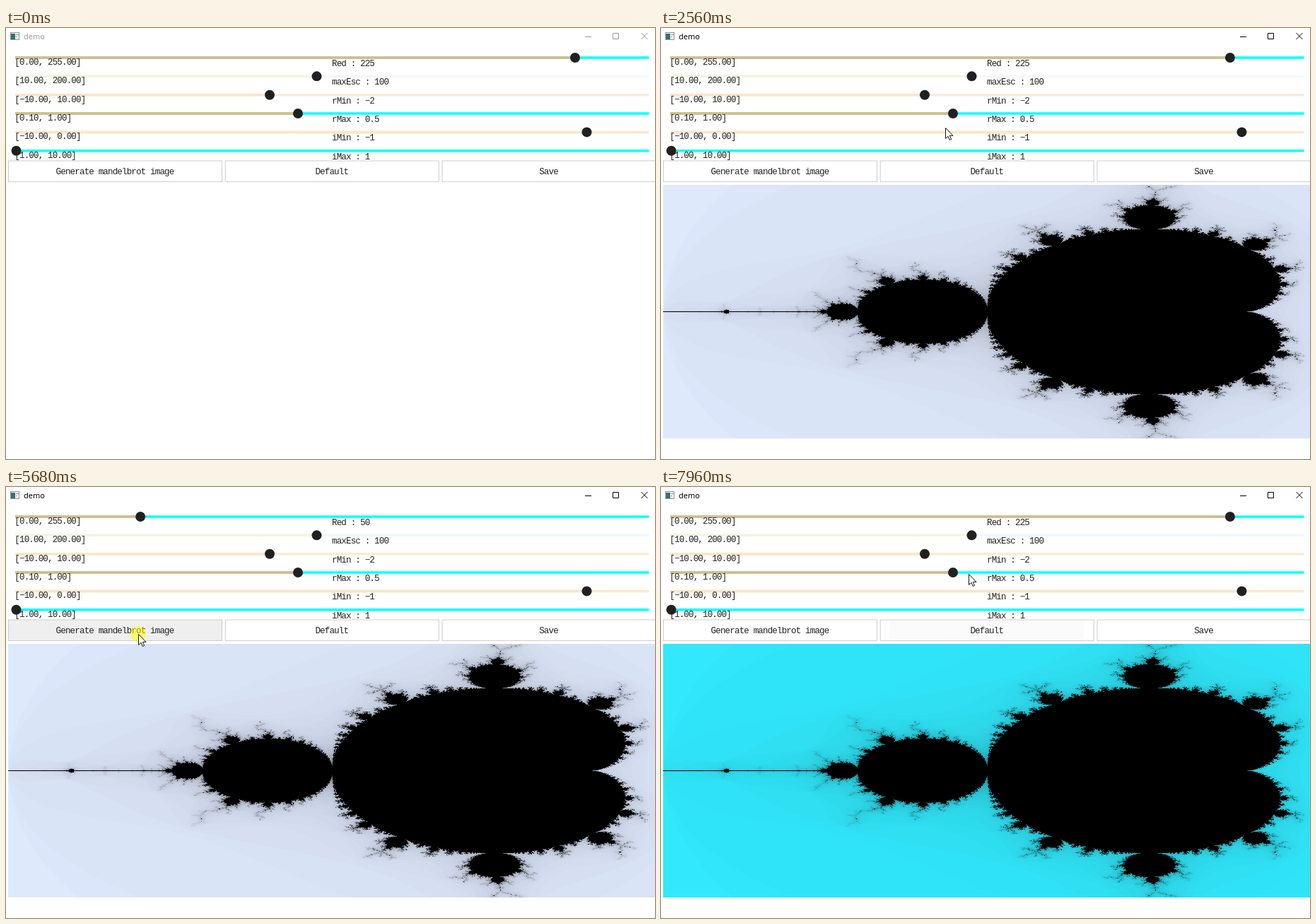
These frames come from a looping animation (918x610 px, 8 s). An HTML page with a canvas:

```html
<!DOCTYPE html>
<html lang="en">
<head>
<meta charset="utf-8">
<title>demo</title>
<style>
  html, body { margin: 0; width: 100%; height: 100%; overflow: hidden; background: #fff; }
  canvas, svg { position: absolute; left: 0; top: 0; display: block; }
  canvas { left: 3px; top: 222px; }
  text { font: 12.5px "Liberation Mono", monospace; letter-spacing: -0.83px; fill: #222; white-space: pre; }
  #title text { font: 11px "Noto Sans", sans-serif; letter-spacing: 0; fill: currentColor; }
</style>
</head>
<body>
<canvas id="image" width="915" height="359"></canvas>
<svg id="stage" width="918" height="610" viewBox="0 0 918 610"></svg>
<script>
const LOOP = 8000, STEP = 40;
const stage = document.getElementById('stage');

function add(parent, tag, attrs, text) {
  const node = document.createElementNS('http://www.w3.org/2000/svg', tag);
  set(node, attrs);
  if (text !== undefined) node.textContent = text;
  parent.appendChild(node);
  return node;
}
function set(node, attrs) {
  for (const key in attrs) node.setAttribute(key, attrs[key]);
}

// Title bar
const title = add(stage, 'g', { id: 'title' });
add(title, 'rect', { x: 6.5, y: 6.5, width: 12, height: 10, fill: '#f4f6f8', stroke: '#8b9298' });
add(title, 'rect', { x: 7, y: 8, width: 6, height: 8, fill: '#35736f' });
add(title, 'path', { d: 'M14 9.5h4M14 12.5h2', stroke: '#7b97b8' });
add(title, 'text', { x: 25, y: 16 }, 'demo');
add(title, 'path', {
  d: 'M819 12.5h9M858.5 7.5h8v8h-8zM898.5 7l9 9M907.5 7l-9 9',
  fill: 'none', stroke: 'currentColor'
});

// Sliders
const CYAN = '#00ffff', TAN = '#deb887';
const sliders = [
  ['[0.00, 255.00]', 'Red : 225', 805.5, TAN, CYAN],
  ['[10.00, 200.00]', 'maxEsc : 100', 439.5, '#f5f5dc', '#f0f8ff'],
  ['[−10.00, 10.00]', 'rMin : −2', 373, '#ffe4c4', '#faebd7'],
  ['[0.10, 1.00]', 'rMax : 0.5', 413, TAN, CYAN],
  ['[−10.00, 0.00]', 'iMin : −1', 821.5, '#ffe4c4', '#ffe8c8'],
  ['[1.00, 10.00]', 'iMax : 1', 14.5, CYAN, CYAN]
].map(([range, label, x, left, right], i) => {
  const y = 42 + i * 26.35;
  const bar = (x1, x2, color) =>
    add(stage, 'line', { x1, x2, y1: y, y2: y, stroke: color, 'stroke-width': 3.5 });
  bar(13, 909.5, right);
  const fill = bar(13, x, left);
  add(stage, 'text', { x: 12.3, y: y + 10 }, range);
  const value = add(stage, 'text', { x: 461, y: y + 12 }, label);
  const knob = add(stage, 'circle', { cx: x, cy: y, r: 7, fill: '#202020' });
  return { fill, value, knob };
});

// Buttons
const buttons = ['Generate mandelbrot image', 'Default', 'Save'].map((label, i) => {
  const x = 3.5 + i * 306.75, box = { x, y: 188, width: 302, height: 29.5 };
  const clip = add(add(stage, 'clipPath', { id: 'clip' + i }), 'rect', box);
  const hover = add(stage, 'rect', { ...box, fill: '#000', opacity: 0 });
  const ripple = add(stage, 'circle', {
    cx: x + 150.5, cy: 202.5, r: 0, fill: '#000', opacity: 0, 'clip-path': `url(#clip${i})`
  });
  add(stage, 'rect', { ...box, fill: 'none', stroke: '#cdcdcd' });
  add(stage, 'text', { x: x + 150.5, y: 206.5, 'text-anchor': 'middle' }, label);
  return { hover, ripple };
});

// Half-painted picture while the set is being computed
function partial(color, edge, curves, marks) {
  const g = add(stage, 'g', { stroke: color, fill: 'none', 'stroke-width': 0.9, display: 'none' });
  add(g, 'rect', { x: 3, y: 222, width: 915, height: 359, fill: '#000', stroke: 'none' });
  add(g, 'path', { d: curves, 'stroke-dasharray': '3 1 1 1 2 1.5' });
  add(g, 'path', { d: `M${edge} 222V581`, 'stroke-width': 1.4 });
  add(g, 'path', { d: marks, 'stroke-width': 2 });
  return g;
}
const whitePartial = partial('#dce4ee', 883.5,
  'M535 222h4M566 222.5L602 233 640 243v4L676 252.500M726 255l9 1M748 258L797 270v4L840 285 883 293' +
  'M890 362l15 4 13 8M884 368l6 6 10 3 7 7 11 6M884 427l13 3 11 7 10 3M896 463l12 5 10 4',
  'M640.5 242v5M797 269v5M884 367v6');
add(whitePartial, 'path', { d: 'M883.5 337v9M883.5 359v3M883.5 431v8M883.5 458v9', stroke: '#000', 'stroke-width': 2 });
const cyanPartial = partial('#2cc8dc', 903.5,
  'M468 222L500 235 550 257 600 271 660 284M802 293l32 6M871 301l32 8M890 222l13 3' +
  'M904 309l8 4 6 5M904 330l14 8M904 356l6 4 8 6M904 469l7 3 7 6',
  'M904 295v13M904 323v7M904 345v12M904 465v6');

// Pointer
const press = add(stage, 'circle', { r: 11, fill: '#ffff00', opacity: 0.55 });
const pointer = add(stage, 'path', {
  d: 'M.5.5V15.500L4 12.300 6.300 17.500 8.600 16.500 6.400 11.400H11Z', fill: '#fff', stroke: '#111'
});

// Mandelbrot set, shaded by escape time
const canvas = document.getElementById('image'), ctx = canvas.getContext('2d');
const MAX_ESC = 100;
const W = canvas.width, H = canvas.height;
const escapes = new Uint8Array(W * H);
function escapeTime(cr, ci) {
  let r = 0, i = 0, n = 0;
  while (n < MAX_ESC && r * r + i * i <= 4) {
    [r, i] = [r * r - i * i + cr, 2 * r * i + ci];
    n++;
  }
  return n;
}
for (let y = 0; y < H; y++)
  for (let x = 0; x < W; x++)
    escapes[y * W + x] = escapeTime(-2 + 2.5 * x / 917, -1 + 2 * y / (H - 1));
function shade(red) {
  const picture = ctx.createImageData(W, H);
  escapes.forEach((n, k) => {
    const light = 1 - n / MAX_ESC;
    picture.data.set([red * light, 235 * light, 255 * light, 255], k * 4);
  });
  return picture;
}
const pictures = { 225: shade(225), 50: shade(50) };
let shown = 0;
function showPicture(red) {
  if (red === shown) return;
  shown = red;
  if (red) ctx.putImageData(pictures[red], 0, 0);
  else ctx.clearRect(0, 0, W, H);
}

// Pointer keys: time, x, y
const path = [
  [320, 718, 553], [1120, 175, 260], [1440, 185, 205], [1960, 185, 205], [2560, 402, 141],
  [2760, 441, 77], [3640, 775, 39], [3920, 820, 39], [4080, 820, 39], [4120, 812, 43],
  [4760, 236, 57], [4840, 214, 61], [5000, 214, 61], [5520, 187, 208], [6400, 187, 208],
  [7040, 363, 97], [7240, 383, 96], [7560, 428, 210], [7720, 428, 210], [7960, 435, 123]
];
function pointerAt(t) {
  const next = path.findIndex(key => key[0] > t);
  if (next < 0) return path[path.length - 1].slice(1);
  if (next === 0) return path[0].slice(1);
  const [t0, x0, y0] = path[next - 1], [t1, x1, y1] = path[next];
  const u = (t - t0) / (t1 - t0), s = u * u * (3 - 2 * u);
  return [x0 + (x1 - x0) * s, y0 + (y1 - y0) * s];
}

const within = (t, [from, to]) => t >= from && t < to;
const clamp = v => Math.max(0, Math.min(1, v));
const presses = [[1600, 1680], [4120, 5040], [5680, 5880], [7600, 7680]];
const hovers = [[[1240, 2120], [5440, 6520]], [[7480, 7800]], []];
const releases = [[1680, 5880], [7680], []];

function redAt(t, x) {
  if (t < 4120 || t >= 7680) return 225;
  return t < 4840 ? Math.round((x - 14.5) / 3.513 / 25) * 25 : 50;
}

function render(now) {
  const t = Math.floor(now % LOOP / STEP) * STEP;
  const [x, y] = pointerAt(t);

  title.setAttribute('color', t < 1600 ? '#999' : '#000');
  set(pointer, { transform: `translate(${Math.round(x)} ${Math.round(y)})`, display: t < 320 ? 'none' : 'inline' });
  set(press, { cx: x, cy: y, display: presses.some(p => within(t, p)) ? 'inline' : 'none' });

  const red = redAt(t, x), knobX = 14.5 + red * 3.513;
  sliders[0].fill.setAttribute('x2', knobX);
  sliders[0].knob.setAttribute('cx', knobX);
  sliders[0].value.textContent = 'Red : ' + red;

  buttons.forEach(({ hover, ripple }, i) => {
    const glow = Math.max(0, ...hovers[i].map(([a, b]) => Math.min(clamp((t - a) / 120), clamp((b + 120 - t) / 120))));
    hover.setAttribute('opacity', 0.063 * glow);
    const start = releases[i].find(s => within(t, [s, s + 400]));
    const rest = start === undefined ? 0 : 1 - (t - start) / 400;
    set(ripple, { r: 151 * (1 - rest * rest), opacity: 0.085 * rest ** 1.5 });
  });

  showPicture(t < 2000 ? 0 : t < 6080 ? 225 : 50);
  whitePartial.setAttribute('display', within(t, [1840, 2000]) ? 'inline' : 'none');
  cyanPartial.setAttribute('display', within(t, [6000, 6080]) ? 'inline' : 'none');
}

const begin = performance.now();
function tick() {
  render(performance.now() - begin);
  requestAnimationFrame(tick);
}
tick();
</script>
</body>
</html>
```
